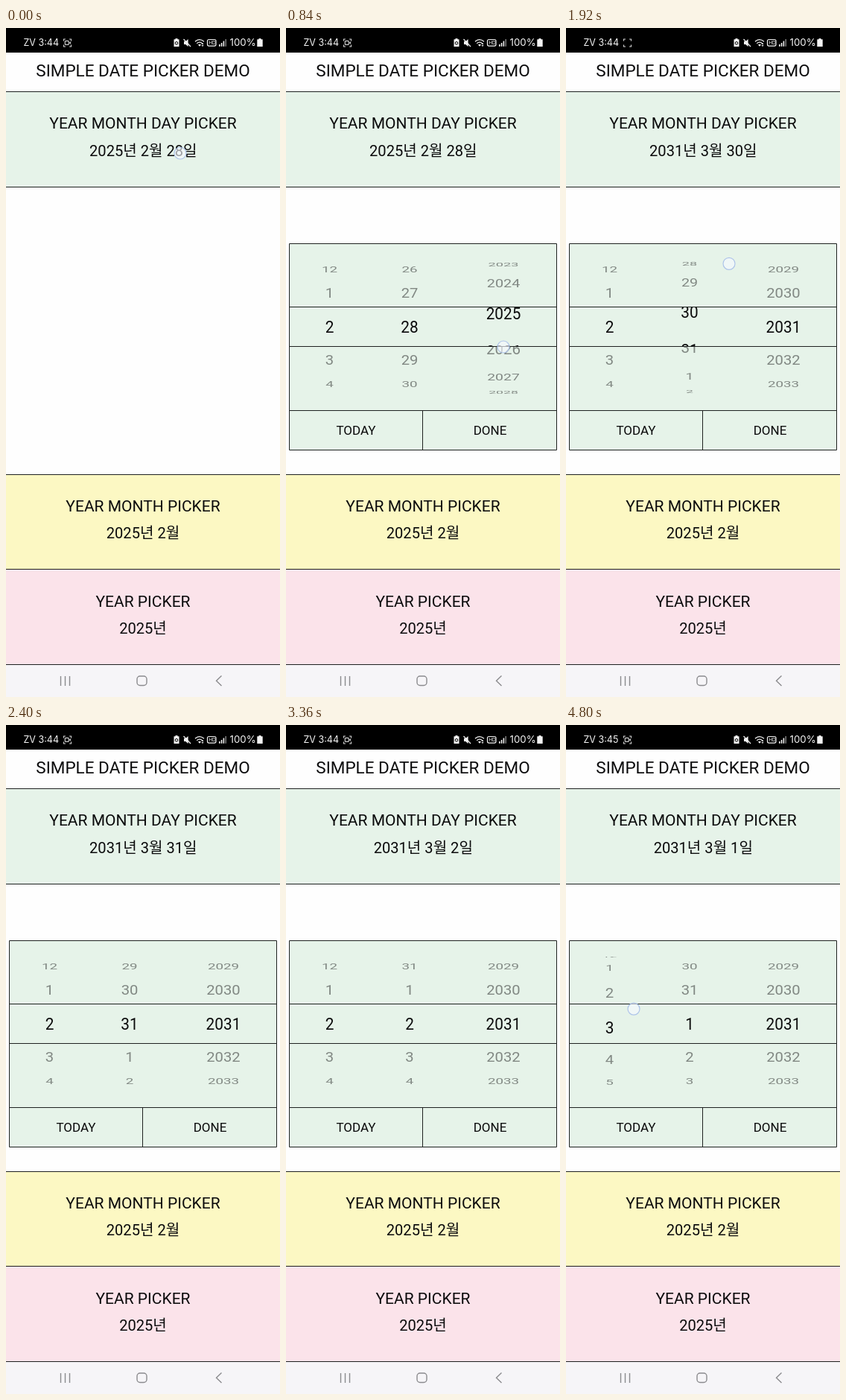
These frames come from a looping animation (368 by 898 pixels, 4920 ms). An HTML page:

```html
<!DOCTYPE html>
<html lang="ko">
<head>
<meta charset="utf-8">
<title>Simple date picker demo</title>
<style>
  html, body { margin: 0; width: 100%; height: 100%; overflow: hidden; background: #fefefe; }
  svg { display: block; width: 100%; height: 100%; }
  text { font-family: Roboto, "Noto Sans CJK KR", "Noto Sans CJK JP", sans-serif; text-anchor: middle; fill: #0b0b0c; }
  .head { font-size: 21px; }
  .date { font-size: 20.1px; }
  .item { font-size: 20.8px; }
  .button { font-size: 17px; }
  .status { font-family: Inter, Roboto, sans-serif; font-size: 12.5px; text-anchor: start; fill: #f4f4f4; }
  .rule { fill: #1e2120; }
  .border { fill: none; stroke: #1e2120; }
  .white { fill: #f4f4f4; }
  .thin { fill: none; stroke: #f4f4f4; stroke-width: 1.2; }
  .nav { fill: none; stroke: #8b8b8e; stroke-width: 1.4; }
</style>
</head>
<body>
<svg viewBox="0 0 368 898">
  <defs>
    <g id="wheels"></g>
    <clipPath id="body"><rect y="33" width="368" height="821"/></clipPath>
    <clipPath id="band"><rect x="5" y="375" width="358" height="52"/></clipPath>
    <clipPath id="around"><path d="M5 311h358v64H5zM5 427h358v64H5z"/></clipPath>
  </defs>

  <rect width="368" height="898" fill="#fefefe"/>
  <text x="184" y="65" font-size="22.5">SIMPLE DATE PICKER DEMO</text>

  <rect y="85" width="368" height="128" fill="#e6f3e9"/>
  <rect y="599" width="368" height="127" fill="#fcf8c3"/>
  <rect y="726" width="368" height="128" fill="#fbe3ea"/>
  <g class="rule">
    <rect y="85" width="368" height="1"/>
    <rect y="213" width="368" height="1"/>
    <rect y="599" width="368" height="1"/>
    <rect y="726" width="368" height="1"/>
  </g>

  <rect id="ripple" x="101" y="143" width="166" height="42" rx="21" fill="#dbe3df"/>
  <text class="head" x="184" y="135.3">YEAR MONTH DAY PICKER</text>
  <text class="date" x="184.3" y="171.5" id="picked"></text>
  <text class="head" x="184" y="648.5">YEAR MONTH PICKER</text>
  <text class="date" x="184" y="685">2025년 2월</text>
  <text class="head" x="184" y="776.5">YEAR PICKER</text>
  <text class="date" x="184" y="813">2025년</text>

  <g clip-path="url(#body)">
    <g id="panel">
      <rect x="4.5" y="289.5" width="359" height="277" fill="#e6f3e9"/>
      <g clip-path="url(#around)" opacity=".46"><use href="#wheels"/></g>
      <g clip-path="url(#band)">
        <use href="#wheels" transform="translate(0 401) scale(1 1.1) translate(0 -401)"/>
      </g>
      <path class="border" d="M4.5 289.5h359v277H4.5zM4.5 374.5h359M4.5 427.5h359M4.5 513.5h359M183.5 513.5v53"/>
      <text class="button" x="94" y="546">TODAY</text>
      <text class="button" x="274" y="546">DONE</text>
    </g>
  </g>

  <rect y="854" width="368" height="44" fill="#f6f5f8"/>
  <rect class="rule" y="854" width="368" height="1"/>
  <g class="nav">
    <path d="M73.5 870v13M79.5 870v13M85.5 870v13M289.5 869.5l-7 6.8 7 6.8"/>
    <rect x="176" y="870" width="13" height="12.5" rx="4"/>
  </g>

  <rect width="368" height="33" fill="#000"/>
  <text class="status" x="23.5" y="24.3" id="clock"></text>
  <path class="thin" opacity=".85" d="M77.5 17.5v-2.5h2.5M85 15h2.5v2.5M87.5 22.5v2.5h-2.5M80 25h-2.5v-2.5"/>
  <g id="cast" opacity=".85">
    <rect class="thin" x="79.3" y="17.4" width="5" height="5" rx="1"/>
    <path class="white" d="M84.5 19.9l2.6-1.8v3.6z"/>
  </g>
  <path class="white" d="M227.5 14h3v1.3h2v9.7h-7v-9.7h2z"/>
  <circle cx="229" cy="20.3" r="1.8" fill="none" stroke="#000"/>
  <path class="white" d="M239 18h2.2l3.4-3v10l-3.4-3H239z"/>
  <path class="thin" d="M238.5 15l9.5 10"/>
  <path class="thin" d="M254 18.2q6-5.2 12 0M256.2 20.7q3.8-3.2 7.6 0"/>
  <path class="white" d="M258 22.5q2-1.4 4 0l-2 2.3zM264 20l1.6 2h-3.2zM264 25l1.6-2h-3.2z"/>
  <rect class="thin" x="270.5" y="15.5" width="11.5" height="8.6" rx="2"/>
  <text class="status" x="272.2" y="22.3" style="font-size:6.6px">HD</text>
  <path class="white" d="M286 22h1.6v2.8H286zM288.8 20h1.6v4.8h-1.6zM291.6 17.5h1.6v7.3h-1.6z"/>
  <path class="white" opacity=".5" d="M294.4 15h1.6v9.8h-1.6z"/>
  <text class="status" x="300.5" y="24.4" style="font-size:13.3px">100%</text>
  <path class="white" d="M339.5 14h3v1.2h2.2v9.8h-7.4v-9.8h2.2z"/>

  <circle id="touch" r="8" fill="#f5f8ff" fill-opacity=".7" stroke="#a8bfe9" stroke-width="1.2"/>
</svg>

<script>
const LOOP = 4920, STEP = 120;
const CENTER = 401, RADIUS = 120, ANGLE = 0.395, DEPTH = 0.003;
const DRAG = 48;    // finger travel per item
const LINGER = 80;  // touch mark fades after release
const $ = id => document.getElementById(id);

const wheels = {
  month: { x: 58.5, first: 2, size: 12 },
  day: { x: 166, first: 28, size: 31 },
  year: { x: 292, first: 2025, size: Infinity }
};

// Each drag turns one wheel by some items, with the finger starting at x, y.
const drags = [
  { wheel: wheels.year, start: 720, span: 560, by: 3, x: 292, y: 445 },
  { wheel: wheels.year, start: 1320, span: 320, by: 3, x: 292, y: 445 },
  { wheel: wheels.day, start: 1680, span: 338, by: 3, x: 219, y: 431 },
  { wheel: wheels.day, start: 2640, span: 310, by: 2, x: 233, y: 343 },
  { wheel: wheels.day, start: 3480, span: 420, by: -1, x: 197, y: 433 },
  { wheel: wheels.month, start: 4500, span: 366, by: 1, x: 91, y: 425 }
];

const clamp = k => Math.min(1, Math.max(0, k));
const smooth = k => k * k * (3 - 2 * k);
const wrap = (n, size) => (n - 1 + size) % size + 1;
const label = (n, size) => size === Infinity ? n : wrap(n, size);
const travel = (drag, t) => drag.by * smooth(clamp((t - drag.start) / drag.span));

for (const wheel of Object.values(wheels)) {
  wheel.items = Array.from({ length: 7 }, () => {
    const item = document.createElementNS('http://www.w3.org/2000/svg', 'text');
    item.setAttribute('class', 'item');
    item.setAttribute('y', 7.4);
    return $('wheels').appendChild(item);
  });
}

// Places items on a cylinder seen in perspective; returns the selected number.
function turn(wheel, t) {
  const pos = drags.filter(d => d.wheel === wheel)
    .reduce((sum, d) => sum + travel(d, t), wheel.first);
  const mid = Math.round(pos);
  wheel.items.forEach((item, i) => {
    const n = mid + i - 3;
    const sin = Math.sin((n - pos) * ANGLE), cos = Math.cos((n - pos) * ANGLE);
    const far = 1 + DEPTH * RADIUS * (1 - cos);
    const y = CENTER + RADIUS * sin / far;
    // Height follows the slope of y, so items flatten towards the rim.
    const sy = Math.max(.01, (cos * far - DEPTH * RADIUS * sin * sin) / (far * far));
    item.textContent = label(n, wheel.size);
    item.setAttribute('transform', `translate(${wheel.x} ${y}) scale(${1 / far} ${sy})`);
  });
  return mid;
}

function showTouch(t) {
  const tap = { start: 0, span: 40, by: 0, x: 234, y: 168 };
  const drag = [tap, ...drags].find(d => t >= d.start && t <= d.start + d.span + LINGER);
  $('touch').style.display = drag ? '' : 'none';
  if (!drag) return;
  const y = drag.y - DRAG * travel(drag, t);
  $('touch').setAttribute('transform', `translate(${drag.x} ${y})`);
  $('touch').setAttribute('opacity', t > drag.start + drag.span ? .4 : .9);
}

function draw(t) {
  $('panel').setAttribute('transform', `translate(0 ${609 * (1 - clamp(t / 420)) ** 3})`);
  $('ripple').setAttribute('opacity', Math.sin(Math.PI * clamp(t / 480)));

  const month = turn(wheels.month, t);
  const day = turn(wheels.day, t);
  const year = turn(wheels.year, t);
  // A day past February's end pushes the date into March.
  const shown = day > 28 ? 3 : month;
  $('picked').textContent = `${year}년 ${shown}월 ${wrap(day, 31)}일`;

  $('clock').textContent = t < 4440 ? 'ZV 3:44' : 'ZV 3:45';
  const blink = t % 800;
  $('cast').style.display = blink < 200 || blink > 600 ? '' : 'none';
  showTouch(t);
}

function tick() {
  const t = performance.now() % LOOP;
  draw(Math.floor(t / STEP) * STEP);
  requestAnimationFrame(tick);
}
tick();
</script>
</body>
</html>
```
